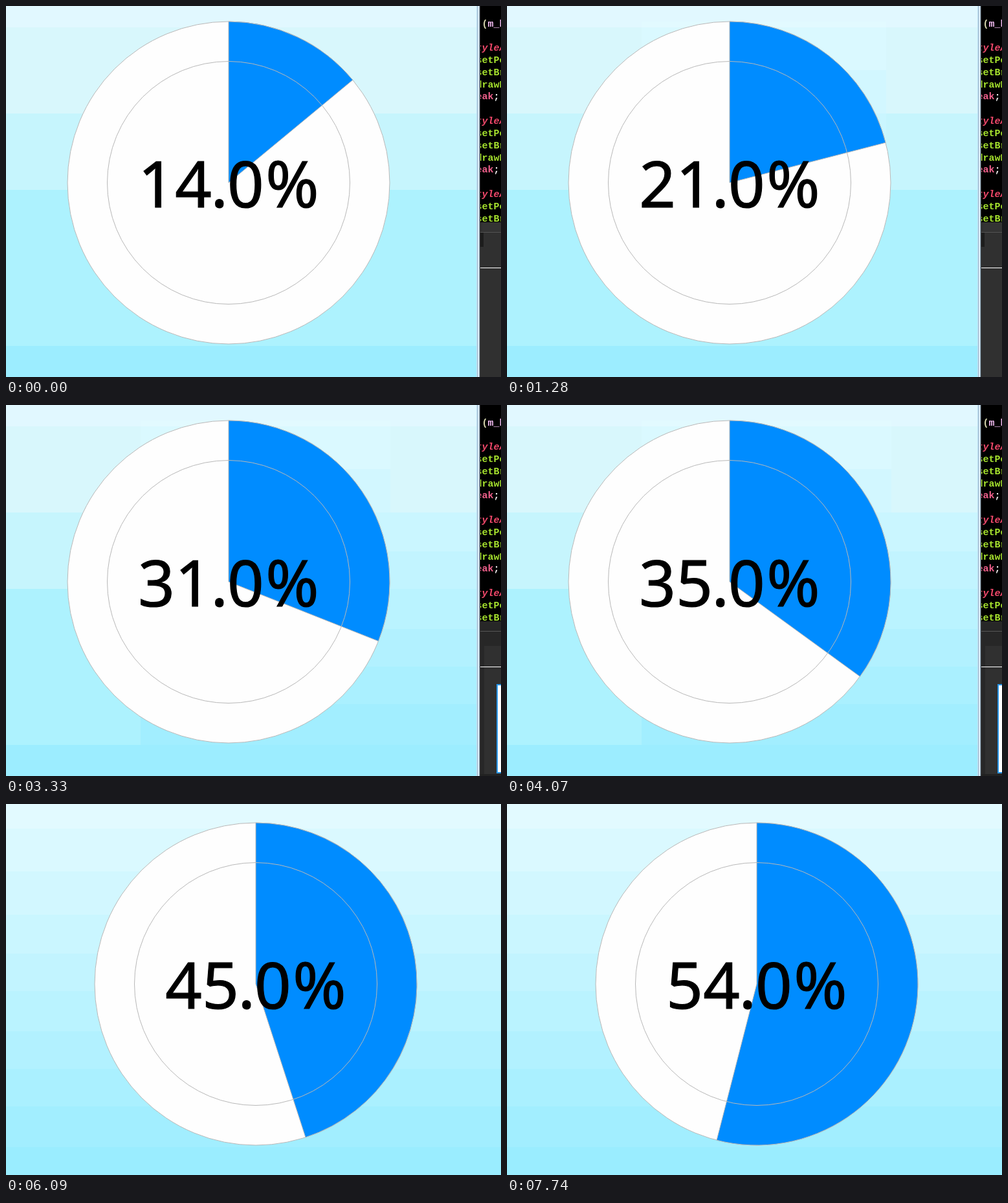
Write an HTML page that moves like this. It is 765x573 px and loops after 8000 ms.

```html
<!DOCTYPE html>
<html lang="en">
<head>
<meta charset="utf-8">
<title>Pie progress</title>
<style>
  html, body { margin: 0; width: 100%; height: 100%; overflow: hidden; }
  svg { display: block; width: 765px; height: 573px; }
  .code { font: bold 15px "Liberation Mono", "DejaVu Sans Mono", monospace; white-space: pre; }
  .value { font: 99px "Noto Sans", "Open Sans", sans-serif; stroke: #000; stroke-width: 1.2; }
  .line { fill: none; stroke: #b8b8b8; stroke-width: 1; }
</style>
</head>
<body>
<svg id="stage" viewBox="0 0 765 573">
  <defs>
    <clipPath id="reveal"></clipPath>
    <clipPath id="editorClip"><rect x="733" width="32" height="334"/></clipPath>
  </defs>
  <g id="coarse"></g>
  <g id="fineClip"><g id="fine"></g></g>
  <g id="desktop">
    <rect x="727" width="1" height="573" fill="#c9e9fa"/>
    <rect x="728" width="1" height="573" fill="#8fb0c8"/>
    <rect x="729" width="2" height="573" fill="#dcecf8"/>
    <rect x="731" width="1" height="573" fill="#a4bccc"/>
    <rect x="732" width="1" height="573" fill="#3c4044"/>
    <rect x="733" width="32" height="334" fill="#000"/>
    <g id="editor" class="code" clip-path="url(#editorClip)"></g>
    <rect x="733" y="334" width="32" height="239" fill="#303030"/>
    <g id="panelIdle">
      <rect x="736" y="334" width="29" height="14" fill="#343434"/>
      <rect x="733" y="349" width="5" height="23" fill="#1c1c1c"/>
    </g>
    <g id="panelHover">
      <rect x="733" y="334" width="32" height="38" fill="#272727"/>
      <rect x="733" y="372" width="6" height="198" fill="#272727"/>
      <rect x="733" y="570" width="32" height="3" fill="#222"/>
    </g>
    <rect x="733" y="349" width="32" height="1" fill="#555"/>
    <rect x="733" y="404" width="32" height="1" fill="#fff"/>
    <rect id="popup" x="759" y="432" width="20" height="136" fill="#fff" stroke="#2593e6" stroke-width="2"/>
  </g>
  <g id="chart">
    <circle cx="344" cy="273" r="249" fill="#fefefe"/>
    <circle class="line" cx="344" cy="273" r="249"/>
    <path id="wedge" fill="#008cff" stroke="#b8b8b8"/>
    <circle class="line" cx="344" cy="273" r="187.5"/>
    <text id="value" class="value" x="204.2" y="310.6" dx="0 0.5 -1.5 -1 2.5"></text>
  </g>
</svg>
<script>
const LOOP = 8000;
const FIRST = 14;
const MAXIMIZE = 5950;
const POPUP_IN = 2900, POPUP_OUT = 4370;

// Moments at which the percentage goes up by one.
const TICKS = [
  150, 290, 590, 710, 980, 1130, 1280, 1560, 1700, 1970, 2110, 2380, 2510,
  2630, 2900, 3060, 3330, 3480, 3630, 3930, 4070, 4230, 4510, 4650, 4800,
  5060, 5210, 5390, 5660, 5800, 6090, 6240, 6500, 6630, 6750, 7040, 7180,
  7320, 7600, 7740
];

// Areas where the smoother gradient gets painted: start, x, y, width, height.
const REPAINTS = [
  [980, 208, 24, 378, 202],
  [1560, 208, 24, 386, 202],
  [2900, 208, 166, 519, 359],
  [4370, 263, 7, 448, 160]
];

const $ = id => document.getElementById(id);

function add(parent, tag, attrs, text = "") {
  const node = document.createElementNS("http://www.w3.org/2000/svg", tag);
  for (const key in attrs) node.setAttribute(key, attrs[key]);
  node.textContent = text;
  parent.append(node);
  return node;
}

function addBands(parent, edges, color) {
  edges.forEach((y, i) => {
    const bottom = edges[i + 1] ?? 600;
    add(parent, "rect", { x: -60, y, width: 885, height: bottom - y, fill: color(i) });
  });
}

const coarseColors = ["#e1f8ff", "#d8f7fc", "#c6f5fd", "#adf2fe", "#9cedff"];
addBands($("coarse"), [-10, 33, 166, 284, 525], i => coarseColors[i]);
addBands($("fine"), [-10, 33, 99, 166, 226, 284, 346, 404, 462, 525],
  i => `rgb(${226 - 8 * i},${250 - 1.5 * i},255)`);

const repaintRects = REPAINTS.map(([, x, y, width, height]) =>
  add($("reveal"), "rect", { x, y, width, height }));

function codeLine(row, text, fill, style = "normal", column = 0) {
  add($("editor"), "text", {
    x: 726.5 + 9 * column, y: 31.5 + 18.83 * row, fill, "font-style": style
  }, text);
}

codeLine(0, "(", "#d8d8b0", "normal", 1);
codeLine(0, "m_b", "#f4bdf4", "normal", 2);
for (const row of [2, 8, 14]) {
  codeLine(row, "tyleA", "#f0486a", "italic");
  codeLine(row + 1, "setPe", "#a6e22e");
  codeLine(row + 2, "setBr", "#a6e22e");
  if (row === 14) continue;
  codeLine(row + 3, "drawE", "#a6e22e");
  codeLine(row + 4, "eak", "#f0608c");
  codeLine(row + 4, ";", "#f4f4f4", "normal", 3);
}

function wedgePath(percent) {
  const angle = percent / 100 * 2 * Math.PI;
  const x = 344 + 249 * Math.sin(angle);
  const y = 273 - 249 * Math.cos(angle);
  return `M344 273V24A249 249 0 ${percent > 50 ? 1 : 0} 1 ${x} ${y}Z`;
}

function show(node, visible) {
  node.setAttribute("display", visible ? "inline" : "none");
}

function draw(t) {
  const percent = FIRST + TICKS.filter(tick => tick <= t).length;
  const maximized = t >= MAXIMIZE;
  const hovered = t >= POPUP_IN;

  $("wedge").setAttribute("d", wedgePath(percent));
  $("value").textContent = percent.toFixed(1) + "%";
  $("chart").setAttribute("transform", maximized ? "translate(42 5)" : "");
  $("fine").setAttribute("transform", maximized ? "translate(0 5)" : "");
  $("fineClip").setAttribute("clip-path", maximized ? "none" : "url(#reveal)");
  repaintRects.forEach((rect, i) => show(rect, t >= REPAINTS[i][0]));

  show($("desktop"), !maximized);
  show($("panelIdle"), !hovered);
  show($("panelHover"), hovered);
  show($("popup"), hovered && t < POPUP_OUT);
}

const start = performance.now();
function frame() {
  draw((performance.now() - start) % LOOP);
  requestAnimationFrame(frame);
}
frame();
</script>
</body>
</html>
```
